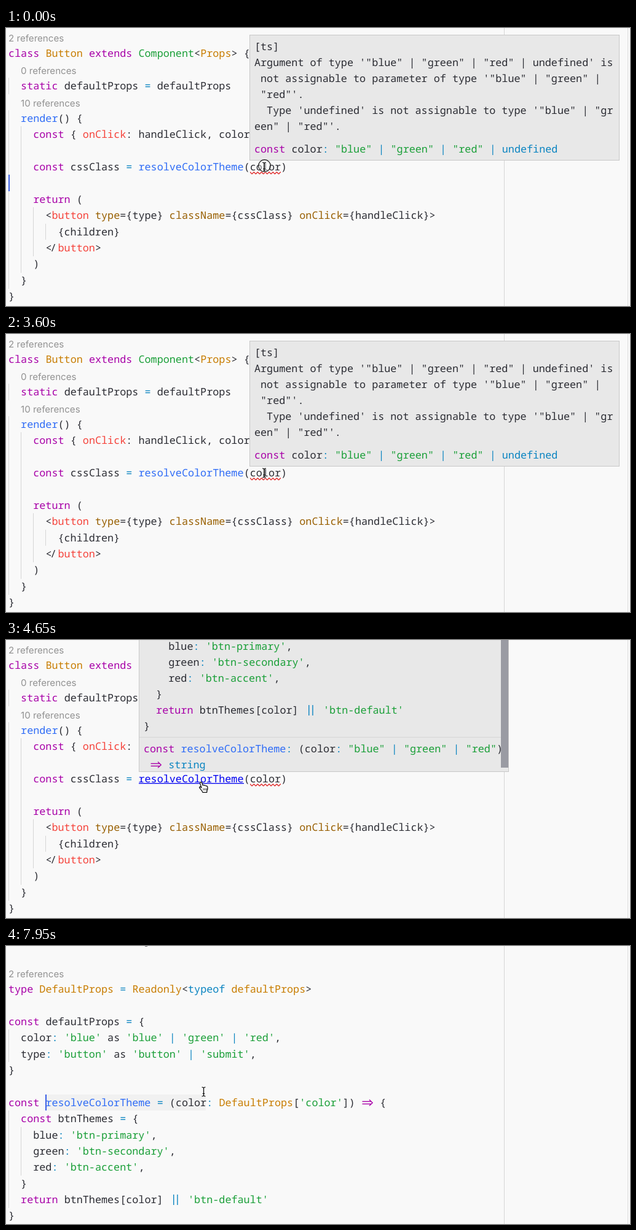
Write an HTML page with a canvas that moves like this. It is 1015 px wide and 453 px high and loops after 8000 ms.

```html
<!DOCTYPE html>
<html lang="en">
<head>
<meta charset="utf-8">
<title>Code editor</title>
<style>
html, body { margin: 0; width: 100%; height: 100%; overflow: hidden; background: #f9f9f9; }
canvas { display: block; }
</style>
</head>
<body>
<canvas id="stage" width="1015" height="453"></canvas>
<script>
const ctx = document.getElementById('stage').getContext('2d');
const LOOP = 8000, CHAR = 10.07, LEFT = 4;
const CODE_FONT = '16.78px "Noto Sans Mono", monospace';
const LENS_FONT = '15.1px Inter, sans-serif';

// "~x" in a code string switches to the colour with key x.
const COLORS = {
  t: '#2b2c33', k: '#a800a8', f: '#2f6cf6', s: '#1a9f38', o: '#c87d00',
  r: '#f5433b', p: '#0a84c1', a: '#985f00', l: '#0000f0'
};

function rect(x, y, w, h, color) {
  ctx.fillStyle = color;
  ctx.fillRect(x, y, w, h);
}

function stroke(color, width, points) {
  ctx.strokeStyle = color;
  ctx.lineWidth = width;
  ctx.beginPath();
  points.forEach(([x, y], i) => i ? ctx.lineTo(x, y) : ctx.moveTo(x, y));
  ctx.stroke();
}

const ligatures = {
  '||'(x, y, color) {
    for (const dx of [6.9, 13.1]) stroke(color, 1.4, [[x + dx, y - 14], [x + dx, y + 3]]);
  },
  '=>'(x, y, color) {
    for (const dy of [-7.6, -3.6]) stroke(color, 1.4, [[x + 1.5, y + dy], [x + 16, y + dy]]);
    stroke(color, 1.4, [[x + 13, y - 10.4], [x + 18.2, y - 5.6], [x + 13, y - 0.8]]);
  },
  '</'(x, y) {
    ctx.fillText('<', x, y);
    ctx.fillText('/', x + 7.6, y);
  }
};

function code(x, y, source) {
  ctx.font = CODE_FONT;
  for (const chunk of source.split('~').slice(1)) {
    const color = ctx.fillStyle = COLORS[chunk[0]];
    for (const part of chunk.slice(1).split(/(=>|\|\||<\/)/)) {
      if (ligatures[part]) ligatures[part](x, y, color);
      else ctx.fillText(part, x, y);
      x += part.length * CHAR;
    }
  }
}

function lens(x, y, count) {
  ctx.font = LENS_FONT;
  ctx.fillStyle = '#929292';
  ctx.fillText(count + ' references', x, y);
}

const guide = (level, top, bottom) =>
  rect(LEFT + level * 20, top, 1, bottom - top, '#d6d6d6');

function page() {
  rect(0, 0, 1015, 453, '#f9f9f9');
  rect(810, 0, 1, 453, '#d6d6d6');
  rect(1011, 0, 1, 453, '#dcdcdc');
}

function squiggle() {
  const points = [];
  for (let x = 397; x <= 447; x += 0.5) points.push([x, 236.3 - 1.4 * Math.cos((x - 397) * Math.PI / 3.1)]);
  stroke('#e02020', 1.3, points);
}

function component(linked) {
  page();
  guide(0, 81, 108);
  guide(0, 134, 425);
  guide(1, 160, 399);
  guide(2, 292, 372);
  guide(3, 319, 345);
  lens(4, 22, 2);
  lens(24, 75, 0);
  lens(24, 128, 10);
  const lines = [
    [47, '~kclass ~oButton ~kextends ~sComponent~t<~oProps~t> {'],
    [100, '~k  static ~tdefaultProps ~p= ~tdefaultProps'],
    [153, '~f  render~t() {'],
    [179, '~k    const ~t{ ~ronClick~t: handleClick, color, type, children } ~p= ~rthis~t.~rprops'],
    [232, `~k    const ~tcssClass ~p= ~${linked ? 'l' : 'f'}resolveColorTheme~t(color)`],
    [285, '~k    return ~t('],
    [311, '~t      <~rbutton ~atype~t={type} ~aclassName~t={cssClass} ~aonClick~t={handleClick}>'],
    [338, '~t        {children}'],
    [364, '~t      </~rbutton~t>'],
    [390, '~t    )'],
    [417, '~t  }'],
    [443, '~t}']
  ];
  for (const [y, source] of lines) code(LEFT, y, source);
  if (linked) rect(216, 233, 171, 1.3, COLORS.l);
  squiggle();
}

function box(x, y, w, h) {
  rect(x, y, w, h, '#c8c8c8');
  rect(x + 1, y + 1, w - 2, h - 2, '#e8e8e8');
}

function errorTooltip() {
  box(396, 11, 602, 205);
  [
    '[ts]',
    'Argument of type \'"blue" | "green" | "red" | undefined\' is',
    ' not assignable to parameter of type \'"blue" | "green" |',
    ' "red"\'.',
    '  Type \'undefined\' is not assignable to type \'"blue" | "gr',
    'een" | "red"\'.'
  ].forEach((line, i) => code(404, 36 + 26 * i, '~t' + line));
  code(404, 203, '~kconst ~tcolor~p: ~s"blue" ~p| ~s"green" ~p| ~s"red" ~p| undefined');
}

function definitionTooltip(alpha) {
  ctx.globalAlpha = alpha;
  box(216, -2, 602, 217);
  rect(217, 158, 588, 1, '#d6d6d6');
  rect(805, 0, 12, 208, '#9a9ba3');
  [
    "~t    blue~p: ~s'btn-primary'~t,",
    "~t    green~p: ~s'btn-secondary'~t,",
    "~t    red~p: ~s'btn-accent'~t,",
    '~t  }',
    "~k  return ~tbtnThemes[color] ~p|| ~s'btn-default'",
    '~t}'
  ].forEach((line, i) => code(224, 16 + 26 * i, line));
  code(224, 183, '~kconst ~fresolveColorTheme~p: ~t(color~p: ~s"blue" ~p| ~s"green" ~p| ~s"red"~t)');
  code(224, 209, '~k => ~pstring');
  ctx.globalAlpha = 1;
}

function definition(highlighted) {
  page();
  if (highlighted) rect(64, 242, 261, 26, '#f1f1f1');
  rect(226, 0, 4, 1, '#77777c');
  guide(0, 136, 189);
  guide(0, 268, 427);
  guide(1, 295, 374);
  lens(4, 51, 2);
  const lines = [
    [76, '~ktype ~oDefaultProps ~p= ~oReadonly~t<~ptypeof ~odefaultProps~t>'],
    [129, '~kconst ~tdefaultProps ~p= ~t{'],
    [155, "~t  color~p: ~s'blue' ~tas ~s'blue' ~p| ~s'green' ~p| ~s'red'~t,"],
    [182, "~t  type~p: ~s'button' ~tas ~s'button' ~p| ~s'submit'~t,"],
    [208, '~t}'],
    [261, "~kconst ~fresolveColorTheme ~p= ~t(color~p: ~oDefaultProps~t[~s'color'~t]) ~k=> ~t{"],
    [287, '~k  const ~tbtnThemes ~p= ~t{'],
    [314, "~t    blue~p: ~s'btn-primary'~t,"],
    [340, "~t    green~p: ~s'btn-secondary'~t,"],
    [366, "~t    red~p: ~s'btn-accent'~t,"],
    [393, '~t  }'],
    [419, "~k  return ~tbtnThemes[color] ~p|| ~s'btn-default'"],
    [445, '~t}']
  ];
  for (const [y, source] of lines) code(LEFT, y, source);
}

function ibeam(x, y) {
  for (const [color, width] of [['#ffffffcc', 2.6], ['#111', 1.2]]) {
    stroke(color, width, [[x - 3, y - 7.5], [x - 1, y - 7.2], [x, y - 6], [x, y + 6], [x - 1, y + 7.2], [x - 3, y + 7.5]]);
    stroke(color, width, [[x + 3, y - 7.5], [x + 1, y - 7.2], [x, y - 6], [x, y + 6], [x + 1, y + 7.2], [x + 3, y + 7.5]]);
    stroke(color, width, [[x - 1.8, y + 3], [x + 1.8, y + 3]]);
  }
}

function clickRing(x, y) {
  ctx.beginPath();
  ctx.arc(x, y, 9.8, 0, 2 * Math.PI);
  ctx.fillStyle = '#ffffff66';
  ctx.fill();
  ctx.strokeStyle = '#111';
  ctx.lineWidth = 1.2;
  ctx.stroke();
}

function hand(x, y) {
  const outline = new Path2D(`M${x} ${y}c1.2 -1 2.4 -.4 2.8 .8l1.2 4c1 -.8 2.4 -.6 2.8 .4
    c1 -.6 2.2 -.2 2.6 .8c1.2 -.4 2.2 .2 2.4 1.4c.4 2.2 .2 4 -.8 5.8l-.4 3.2h-6.6
    c-.6 -2 -2 -3.4 -3.2 -5c-.8 -1.2 -1.8 -2 -2.2 -3c0 -1.4 1.6 -1.6 2.8 -.2l.6 .6l-2.2 -6.6
    c-.3 -.9 -.2 -1.7 .2 -2.2z`);
  ctx.fillStyle = '#fff';
  ctx.fill(outline);
  ctx.strokeStyle = '#111';
  ctx.lineWidth = 1.3;
  ctx.stroke(outline);
  for (const dx of [5, 7.4, 9.8]) stroke('#111', 0.9, [[x + dx, y + 9.5], [x + dx + 0.1, y + 13]]);
}

const blinks = [600, 1050, 1500, 2100, 2550, 3000, 3600, 4050, 4500, 4950, 5400, 6000, 6450, 6900, 7500, 7950];

function draw(t) {
  const caretOn = blinks.filter(time => time <= t).length % 2 === 0;
  if (t < 4950) {
    component(t >= 4200);
    if (caretOn) rect(4, 239, 2, 27, '#3a5fe5');
    if (t < 3900) errorTooltip();
    if (t >= 4500) definitionTooltip(t < 4650 ? 0.67 : 1);
    if (t < 150) clickRing(420.5, 224.5);
    if (t < 3750) ibeam(420, 226.5);
    else if (t < 3900) ibeam(373.5, 226);
    else if (t < 4050) ibeam(334, 228.5);
    else hand(316, 232);
  } else {
    definition(t >= 7950);
    if (caretOn) rect(64, 242, 2, 26, '#3a5fe5');
    if (t < 5100) clickRing(319.5, 229.5);
    if (t < 7950) ibeam(319, 230.5);
    else ibeam(321.5, 237.5);
  }
}

ctx.textRendering = 'geometricPrecision';
ctx.lineJoin = 'round';

function tick(now) {
  draw(now % LOOP);
  requestAnimationFrame(tick);
}
draw(0);
requestAnimationFrame(tick);
</script>
</body>
</html>
```
